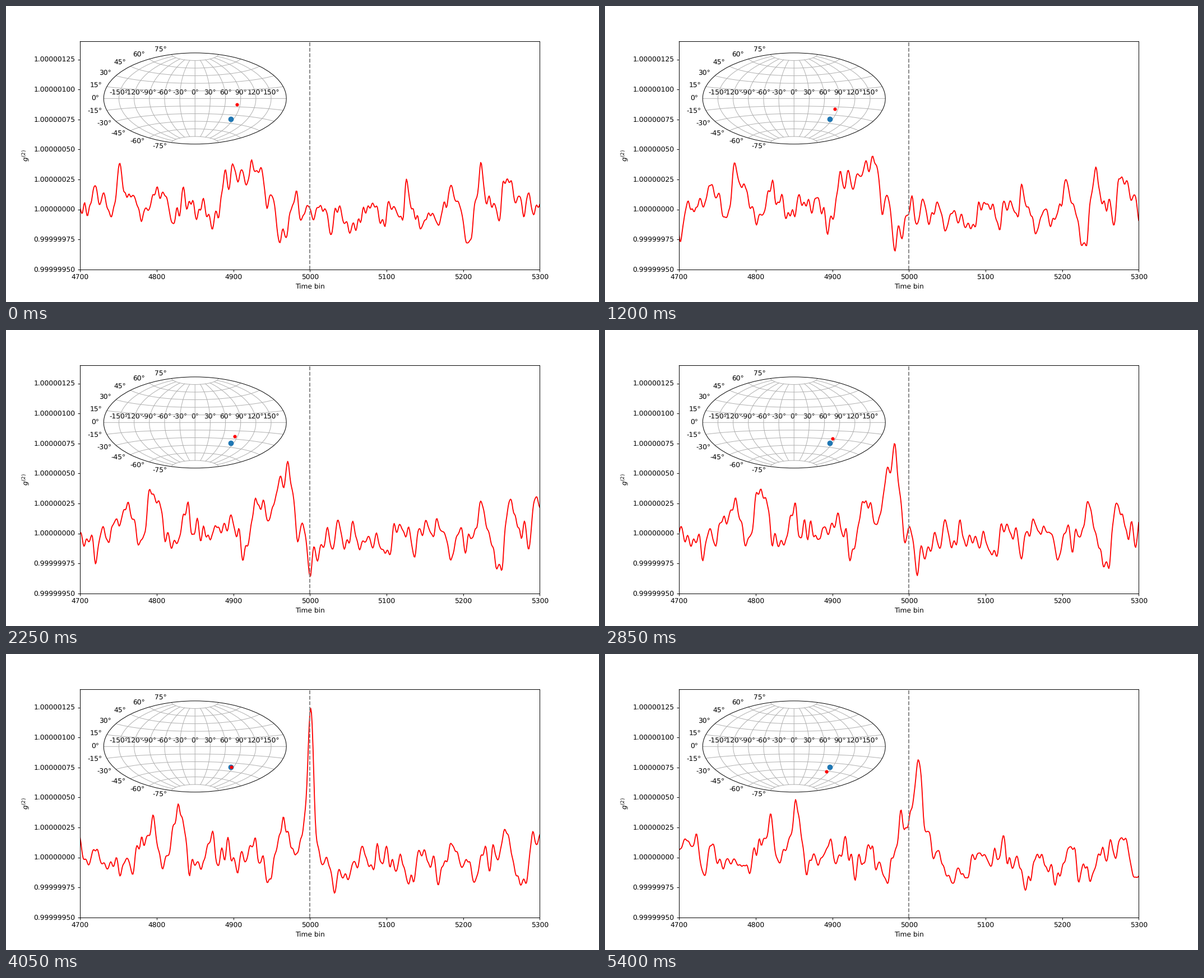
A matplotlib script for the animation above (5.55 s loop, 1058 px wide and 529 px high).

```python
import numpy as np
import matplotlib.pyplot as plt
from matplotlib.animation import FuncAnimation
from matplotlib.ticker import FormatStrFormatter, MultipleLocator

plt.rcParams["text.hinting"] = "none"

W, H = 1058, 529
FRAMES, INTERVAL = 37, 150
LO, HI = 4700, 5300
UNIT = 1e-8
DRIFT = 2.65   # bins per step
MEET = 27.3    # step at which the two points coincide
bins = np.arange(LO, HI + 1)

# Lasting bumps and dips that drift along: start bin, level, width
BUMPS = [
    (4620, 20, 7), (4682, -12, 5), (4722, 20, 6), (4755, 32, 6),
    (4803, 12, 6), (4874, -14, 7), (4895, 25, 7), (4962, -22, 8),
    (5056, -21, 7), (5095, -15, 6), (5142, -13, 6), (5185, 14, 6),
    (5205, -19, 6), (5225, 20, 6), (5258, 32, 6)]


def gauss(x, mid, width):
    return np.exp(-((x - mid) / width) ** 2 / 2)


rng = np.random.default_rng(12)
field_bins = np.arange(LO - 120, HI + 21)
kernel = gauss(np.arange(-10, 11), 0, 1.8)


def noise_field():
    """Smoothed white noise with a fixed spread."""
    field = np.convolve(rng.normal(size=len(field_bins)), kernel, "same")
    return 7 * field / field.std()


field_a, field_b = noise_field(), noise_field()


def background(t):
    """Noise that drifts right and slowly changes its pattern."""
    x = bins - DRIFT * t
    turn = 0.07 * t
    field = np.cos(turn) * field_a + np.sin(turn) * field_b
    return (np.interp(x, field_bins, field)
            + sum(level * gauss(x, mid, width) for mid, level, width in BUMPS))


def peak(t):
    """Coincidence peak: sharpest when the points meet, slower afterwards."""
    gap = abs(t - MEET)
    mid = 4925 + 2.78 * min(t, 27) + 1.3 * max(t - 27, 0)
    height = 30 + 92 / (1 + (gap / 7) ** 2)
    return height * gauss(bins, mid, 4 + 0.45 * gap)


def signal(t):
    return 1 + UNIT * (background(t) + peak(t))


fig, ax = plt.subplots(figsize=(12, 6), dpi=W / 12)
line, = ax.plot(bins, signal(0), color="red", lw=1.5)
ax.axvline(5000, color="gray", ls="--", lw=1.5)
ax.set_xlim(LO, HI)
ax.set_ylim(1 - 50 * UNIT, 1 + 140 * UNIT)
ax.xaxis.set_major_locator(MultipleLocator(100))
ax.set_yticks(1 + UNIT * np.arange(-50, 126, 25))
ax.yaxis.set_major_formatter(FormatStrFormatter("%.8f"))
ax.set_xlabel("Time bin")
ax.set_ylabel("$g^{(2)}$")
ax.spines["top"].set_snap(False)

sky = ax.inset_axes([0.05, 0.55, 0.4, 0.4], projection="aitoff")
sky.grid(True)
for grid_line in sky.get_xgridlines() + sky.get_ygridlines():
    grid_line.set_snap(False)


def on_sky(x, y):
    """Pixel position to fractions of the sky map."""
    return 0.5 + (x - 337.24) / 325.87, 0.5 - (y - 165.3) / 162.93


def pointer_at(t):
    return on_sky(412.5 - 0.2 * t - 0.0076 * t ** 2, 176 + 0.955 * t)


def dot(pos, color, size):
    return sky.plot(*[[p] for p in pos], "o", color=color, ms=size,
                    transform=sky.transAxes)[0]


dot(on_sky(401.4, 202.4), "tab:blue", 7)
pointer = dot(pointer_at(0), "red", 4)


def draw(t):
    line.set_ydata(signal(t))
    pointer.set_data(*[[p] for p in pointer_at(t)])
    return line, pointer


anim = FuncAnimation(fig, draw, frames=FRAMES, interval=INTERVAL,
                     init_func=lambda: draw(0), repeat=True, repeat_delay=0)
plt.show()
```
